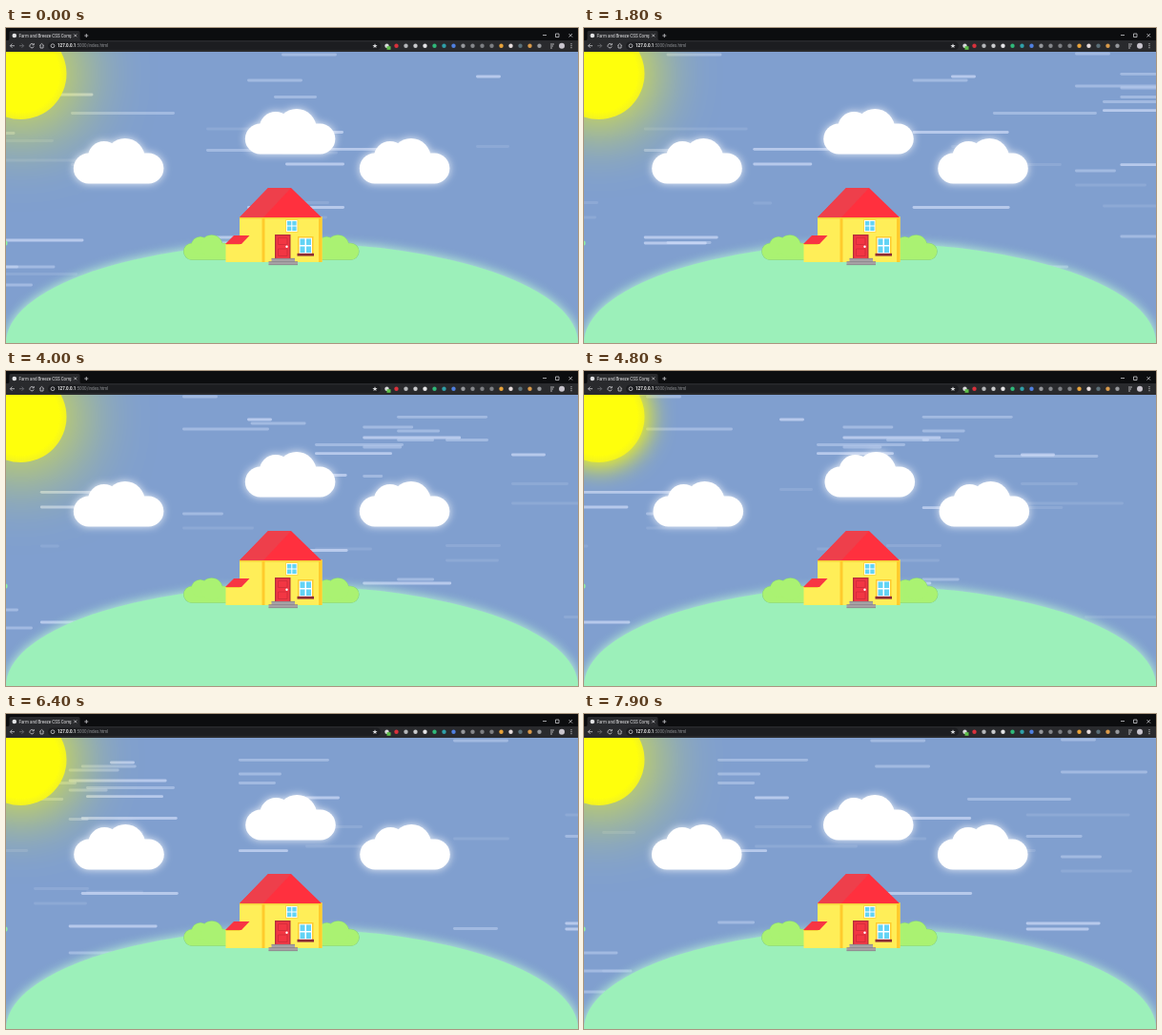
An HTML page that plays this animation: 600 by 331 pixels, repeating every 8000 ms.

```html
<!DOCTYPE html>
<html lang="en">
<head>
<meta charset="utf-8">
<title>Windy hill</title>
<style>
html, body { margin: 0; width: 100%; height: 100%; overflow: hidden; background: #809fcf; }
svg { display: block; width: 100vw; height: 100vh; }
text { font: 4.5px Roboto, "Open Sans", sans-serif; }
</style>
</head>
<body>
<svg viewBox="0 0 600 331" preserveAspectRatio="none">
  <defs>
    <filter id="sunBlur" filterUnits="userSpaceOnUse" x="-160" y="-130" width="360" height="380">
      <feGaussianBlur id="sunSoft" stdDeviation="41"/>
    </filter>
    <filter id="hillBlur" filterUnits="userSpaceOnUse" x="-40" y="190" width="680" height="300">
      <feGaussianBlur stdDeviation="5"/>
    </filter>
    <filter id="cloudBlur" x="-25%" y="-45%" width="150%" height="190%">
      <feGaussianBlur stdDeviation="4.5"/>
    </filter>
    <radialGradient id="sunFill">
      <stop offset=".84" stop-color="#ffff0c"/>
      <stop offset="1" stop-color="#f3f322"/>
    </radialGradient>
    <clipPath id="tabClip"><rect x="13" y="3" width="55.5" height="10"/></clipPath>
    <g id="puff">
      <rect y="15.5" width="94.5" height="32" rx="16"/>
      <circle cx="32" cy="20" r="17"/>
      <circle cx="54" cy="21" r="21"/>
    </g>
    <g id="cloud" fill="#fff">
      <use href="#puff" filter="url(#cloudBlur)" opacity=".85"/>
      <use href="#puff"/>
    </g>
    <g id="bush">
      <use href="#puff" fill="#86cf86" stroke="#86cf86" stroke-width="2"/>
      <use href="#puff" fill="#aaf272"/>
    </g>
  </defs>

  <rect width="600" height="331" fill="#809fcf"/>
  <g id="wind" fill="#dce6ff"></g>

  <circle cx="15.5" cy="48" r="53" fill="#ff0" filter="url(#sunBlur)"/>
  <circle cx="15.5" cy="48" r="48" fill="url(#sunFill)"/>

  <ellipse cx="300" cy="331" rx="302" ry="107" fill="#b9f7d6" opacity=".8" filter="url(#hillBlur)"/>
  <ellipse cx="300" cy="331" rx="300" ry="105" fill="#9cf0ba"/>
  <ellipse cx="0" cy="226" rx="1.6" ry="2.6" fill="#8df0a6"/>

  <g id="clouds">
    <use href="#cloud" x="70.8" y="116"/>
    <use href="#cloud" x="250.8" y="85"/>
    <use href="#cloud" x="370.8" y="116"/>
  </g>
  <g id="bushes">
    <use href="#bush" transform="translate(186.5 217.8) scale(.54)"/>
    <use href="#bush" transform="translate(319 217.8) scale(.54)"/>
  </g>

  <g id="house">
    <path d="M245 198h86.500v48H230.500v-20H245z" fill="#ffee58"/>
    <path d="M230.500 227h15v1h-15zM245 199h86v1.500h-86z" fill="#f5cf3a"/>
    <path d="M268.500 199h3v47h-3zM328 199h3.500v47H328z" fill="#ffcb2c"/>
    <path d="M245 199l30-31h24l32 31z" fill="#ff303e"/>
    <path d="M245 199l30-31h24l-29 31z" fill="#ee3f4b"/>
    <path d="M230 227l9-9h16.500l-8.500 9z" fill="#f83543"/>
    <path d="M293 201h13.500v14H293z" fill="#ffd94a"/>
    <path d="M294 202h11.500v12H294z" fill="#fff"/>
    <path d="M295 203h4.300v4.500H295zM300.300 203h4.300v4.500h-4.300zM295 208.500h4.300v4.500H295zM300.300 208.500h4.300v4.500h-4.300z" fill="#62d3f5"/>
    <path d="M306 219h16.500v18H306z" fill="#ffcb2c"/>
    <path d="M307.500 220.500h13.500V237h-13.500z" fill="#fff"/>
    <path d="M308.500 221.500h5v6.500h-5zM315 221.500h5v6.500h-5zM308.500 229.500h5v6.500h-5zM315 229.500h5v6.500h-5z" fill="#62d3f5"/>
    <path d="M305.500 236.800h17.500v2.800h-17.500z" fill="#8d2b35"/>
    <path d="M282 217h16.500v25.500H282z" fill="#b3303a"/>
    <path d="M283.300 218.300h13.900v24.200h-13.900z" fill="#f23643"/>
    <path d="M285.500 220.500h9.500v7h-9.500zM285.500 232h9.500v7.500h-9.500z" fill="none" stroke="#cf2c39" stroke-width=".8"/>
    <circle cx="294.500" cy="229.800" r="1.200" fill="#fff"/>
    <path d="M278.500 242h24.500v3.500h-24.500zM275.500 245.500H306v3.500h-30.500z" fill="#a7a2a5"/>
    <path d="M278.500 242.300H303M275.500 245.600H306M275.500 248.700H306" stroke="#7d787d" stroke-width=".6"/>
  </g>

  <g id="browser">
    <rect width="600" height="25" fill="#292a2d"/>
    <rect width="600" height="13" fill="#0c0d0f"/>
    <path d="M2 13q1.500 0 1.500-2V4.500Q3.500 3 5 3h71q1.500 0 1.500 1.500V11q0 2 1.500 2z" fill="#292a2d"/>
    <circle cx="8.800" cy="8" r="2.300" fill="#e3e3e5"/>
    <text x="13.500" y="9.600" fill="#e4e4e6" clip-path="url(#tabClip)">Farm and Breeze CSS Composition</text>
    <rect x="44" y="14.500" width="349" height="8.500" rx="4.250" fill="#1c1d20"/>
    <text x="54" y="20.400" fill="#f0f0f0"><tspan font-weight="600">127.0.0.1</tspan><tspan fill="#8e9094">:5000/index.html</tspan></text>
    <g fill="none" stroke="#c9cacd" stroke-width=".8">
      <path d="M71.300 6.500l2.800 2.800m0-2.800l-2.800 2.800M82.300 8h4M84.300 6v4M563 7.500h4M576.500 6h3.500v3.500h-3.500zM590.500 6l3.500 3.500m0-3.500L590.500 9.500"/>
      <path d="M9 18.700H4.500M6.500 16.600l-2.100 2.100 2.100 2.100M35.200 18.500l2.300-2.100 2.300 2.100M36 18v3h3v-3"/>
      <path d="M14 18.700h4.500M16.500 16.600l2.100 2.100-2.100 2.100" stroke="#707276"/>
      <path d="M28.800 17.300A2.200 2.200 0 1 0 29.200 19.400M29.300 16v1.800h-1.800"/>
      <circle cx="49" cy="18.700" r="1.900"/>
    </g>
    <path d="M387 16.200l.7 1.700 1.900.1-1.500 1.200.5 1.800-1.600-1-1.600 1 .5-1.800-1.500-1.200 1.900-.1z" fill="#d6d7d9"/>
    <g id="icons"></g>
    <path d="M571 17h4M571 19h3M571 21h2" stroke="#d0d1d3" stroke-width=".8"/>
    <circle cx="583" cy="18.700" r="3" fill="#c9c5ce"/>
    <g fill="#c9cacd"><circle cx="593" cy="16.700" r=".6"/><circle cx="593" cy="18.700" r=".6"/><circle cx="593" cy="20.700" r=".6"/></g>
  </g>
</svg>

<script>
const LOOP = 8000, STEP = 100, START = 600, TRAVEL = 900;
const ALPHA = { hi: .6, mid: .37, lo: .13 };
const byId = id => document.getElementById(id);

// Each gust crosses the stage in p seconds, starting at x; streaks are [y, width].
const gusts = [
  { p: 6, x: -115, mid: [[27, 37], [61, 91], [150, 43]], lo: [[165, 75]] },
  { p: 15, x: 493, hi: [[51, 26]], lo: [[124.5, 35], [270, 28]] },
  { p: 8, x: 289, mid: [[28, 58], [225.5, 47]], lo: [[131, 59]] },
  { p: 5, x: 281, mid: [[72.5, 45]], lo: [[183.5, 58], [199, 56]] },
  { p: 14, x: 293, hi: [[127.3, 107], [143, 62], [264, 64]], lo: [[184, 20]] },
  { p: 11, x: 210, hi: [[220, 78], [226, 66]], mid: [[128.5, 59]], lo: [[106, 109]] },
  { p: 2.004, x: 253, hi: [[109.5, 101], [188.5, 102]], mid: [[55, 58]] },
  { p: 3.005, x: 68, mid: [[89.5, 109]], lo: [[143.5, 72]] },
  { p: 10, x: -10, hi: [[88, 36]], lo: [[118.5, 60], [139, 108]] },
  { p: 13, x: -213, hi: [[143.7, 52]], mid: [[48.3, 95], [63, 45], [72.5, 39], [219, 39]] },
  { p: 7, x: -11.5, hi: [[70, 103], [223, 93]], mid: [[59, 53], [80, 41], [110.5, 21], [251, 63]] },
  { p: 9, x: -176, hi: [[86.700, 81]], mid: [[77.5, 93]], lo: [[187, 60]] },
  { p: 12, x: -15, lo: [[258.5, 90]] },
  { p: 4, x: -42, mid: [[251, 55], [270, 70], [292, 42]] }
];

function add(parent, tag, attrs) {
  const el = document.createElementNS("http://www.w3.org/2000/svg", tag);
  for (const key in attrs) el.setAttribute(key, attrs[key]);
  return parent.appendChild(el);
}

for (const gust of gusts) {
  gust.el = add(byId("wind"), "g", {});
  for (const level in ALPHA)
    for (const [y, width] of gust[level] || [])
      add(gust.el, "rect", { y: y - 1.4, width, height: 2.8, rx: 1.4, opacity: ALPHA[level] });
}

const iconColors = ("#d9dadc #d9313c #b5b7ba #c9cacc #e4e4e6 #2fb879 #2f9fa8 #4f7fe0 #96989c " +
  "#85878b #7d7f83 #7d7f83 #e8a33a #e6dcdc #5b6f78 #d99a4a #96989c").split(" ");
iconColors.forEach((fill, i) => add(byId("icons"), "circle", { cx: 399.5 + 10 * i, cy: 18.7, r: 2.2, fill }));
add(byId("icons"), "rect", { x: 399.5, y: 19.2, width: 4, height: 3.6, fill: "#5fc04a" });

function draw(ms) {
  const t = ms / 1000;
  for (const { p, x, el } of gusts) {
    const gone = (START - x + TRAVEL * t / p) % TRAVEL;
    el.setAttribute("transform", `translate(${START - gone} 0)`);
  }
  // 0 = clouds at rest, wide sun glow; 1 = clouds pushed right, tight glow
  const sway = (1 + Math.cos(Math.PI * (t - 1.1))) / 2;
  byId("clouds").setAttribute("transform", `translate(${2.2 * sway} 0)`);
  byId("bushes").setAttribute("transform", `translate(${1.1 * sway} 0)`);
  byId("sunSoft").setAttribute("stdDeviation", 6 + 36 * (1 - sway));
}

const begin = performance.now();
let last = -1;
function tick() {
  const ms = Math.floor((performance.now() - begin) % LOOP / STEP) * STEP;
  if (ms !== last) draw(last = ms);
  requestAnimationFrame(tick);
}
tick();
</script>
</body>
</html>
```
